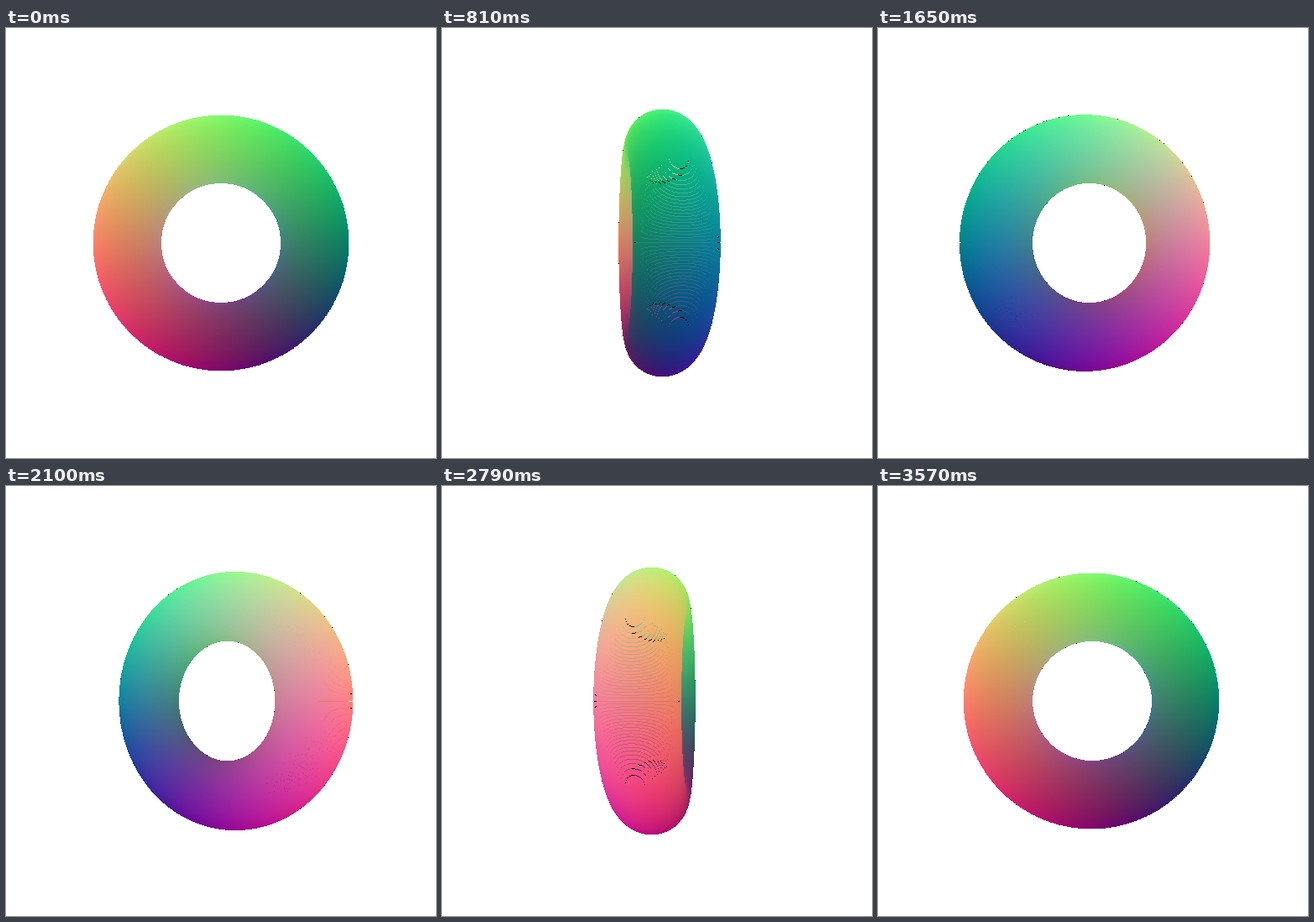
These frames come from a looping animation (512 by 512 pixels, 3.6 s). An HTML page with a canvas:

```html
<!DOCTYPE html>
<html>
<head>
<meta charset="utf-8">
<style>
  html, body { margin: 0; height: 100%; overflow: hidden; background: #fff; }
  canvas { display: block; }
</style>
</head>
<body>
<canvas width="512" height="512"></canvas>
<script>
const SIZE = 512, HALF = SIZE / 2;
const LOOP = 3600, STEP = 30;
const RING = 1, TUBE = 0.35, DISTANCE = 4;
const FOCAL = HALF / Math.tan(Math.PI / 6);
const RING_POINTS = 1000, TUBE_POINTS = 400, COUNT = RING_POINTS * TUBE_POINTS;
const BLACK = 0xff000000, WHITE = 0xffffffff;

const ctx = document.querySelector('canvas').getContext('2d');
const image = ctx.createImageData(SIZE, SIZE);
const pixels = new Uint32Array(image.data.buffer);
const nearness = new Float32Array(SIZE * SIZE);
const [xs, ys, zs, normalX, normalZ, planes] =
  Array.from({ length: 6 }, () => new Float32Array(COUNT));
const colors = new Uint32Array(COUNT);

const channel = p => Math.round(255 * (0.5 + p / 2 / (RING + TUBE)));
const rgb = (r, g, b) => (255 << 24 | b << 16 | g << 8 | r) >>> 0;

// A cloud of points on the torus, coloured by position
for (let i = 0, n = 0; i < RING_POINTS; i++) {
  const u = i / RING_POINTS * 2 * Math.PI;
  for (let j = 0; j < TUBE_POINTS; j++, n++) {
    const v = j / TUBE_POINTS * 2 * Math.PI;
    const radius = RING + TUBE * Math.cos(v);
    const x = xs[n] = radius * Math.cos(u);
    const y = ys[n] = radius * Math.sin(u);
    const z = zs[n] = TUBE * Math.sin(v);
    normalX[n] = Math.cos(v) * Math.cos(u);
    normalZ[n] = Math.sin(v);
    planes[n] = RING * Math.cos(v) + TUBE;
    colors[n] = rgb(channel(-x), channel(y), channel(-z));
  }
}

function plotPoints(angle) {
  const c = Math.cos(angle), s = Math.sin(angle);
  pixels.fill(WHITE);
  nearness.fill(0);
  for (let n = 0; n < COUNT; n++) {
    const scale = FOCAL / (DISTANCE - xs[n] * s - zs[n] * c);
    const px = HALF + (xs[n] * c - zs[n] * s) * scale | 0;
    const py = HALF - ys[n] * scale | 0;
    const at = py * SIZE + px;
    if (scale > nearness[at]) {
      nearness[at] = scale;
      // Points turned just past the silhouette are black
      const facing = DISTANCE * (normalX[n] * s + normalZ[n] * c) - planes[n];
      pixels[at] = facing < 0 && facing > -1 ? BLACK : colors[n];
    }
  }
}

let shown = -1;
function frame() {
  const step = Math.floor(performance.now() % LOOP / STEP);
  if (step !== shown) {
    shown = step;
    plotPoints(step * STEP / LOOP * 2 * Math.PI);
    ctx.putImageData(image, 0, 0);
  }
  requestAnimationFrame(frame);
}
frame();
</script>
</body>
</html>
```
